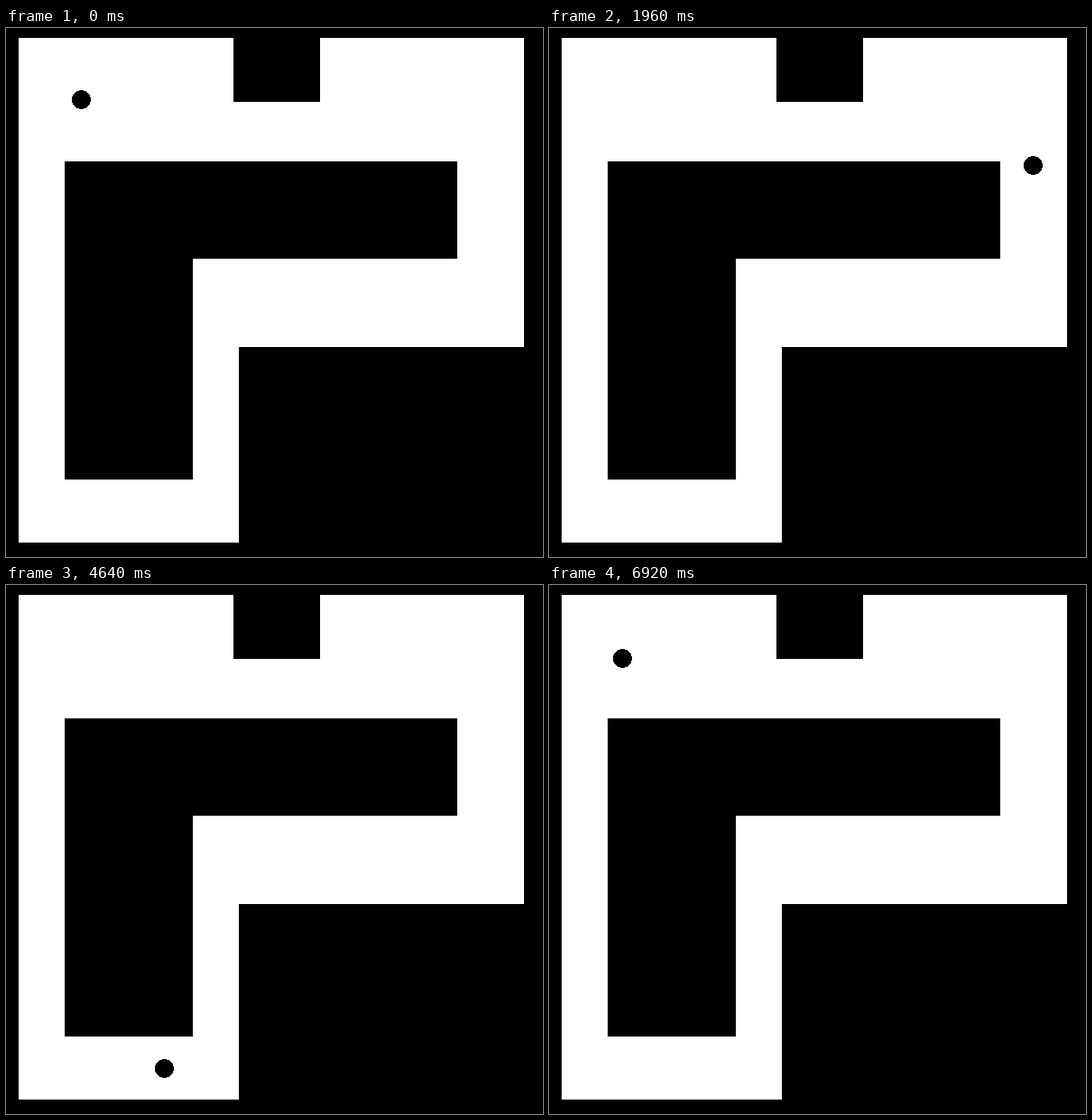
These frames come from a looping animation (595 by 587 pixels, 6960 ms). An HTML page:

```html
<!DOCTYPE html>
<html>
<head>
<meta charset="utf-8">
<title>Dot touring a corridor</title>
<style>
  html, body { margin: 0; width: 100%; height: 100%; overflow: hidden; background: #000; }
  svg { display: block; }
</style>
</head>
<body>
<svg width="595" height="587" shape-rendering="crispEdges">
  <path fill="#fff" fill-rule="evenodd" d="M14 11H252V82H348V11H574V354H258V571H14Z
    M65 148H500V256H207V501H65Z"/>
  <circle id="dot" r="10.5"/>
</svg>
<script>
const STEP_MS = 40, STEPS = 174, STEP_PX = 10;
const dot = document.getElementById('dot');

// Middle line of the corridor
const route = [
  [83, 79], [183, 79], [186, 82], [252, 115], [348, 115], [414, 82], [417, 79],
  [500, 79], [502, 81], [536, 148], [536, 256], [516, 296], [500, 305],
  [257, 305], [232, 354], [232, 501], [217, 530], [207, 536], [65, 536],
  [54, 530], [39, 501], [39, 148], [65, 97], [83, 79]
];

// A diagonal pixel move counts the same as a straight one
function pointAt(dist) {
  for (let i = 1; i < route.length; i++) {
    const [x0, y0] = route[i - 1], [x1, y1] = route[i];
    const len = Math.max(Math.abs(x1 - x0), Math.abs(y1 - y0));
    if (dist <= len) {
      const k = dist / len;
      return [x0 + (x1 - x0) * k, y0 + (y1 - y0) * k];
    }
    dist -= len;
  }
  return route[0];
}

const start = performance.now();

function draw(now) {
  const step = Math.floor(Math.max(0, now - start) / STEP_MS) % STEPS;
  const [x, y] = pointAt(step * STEP_PX);
  dot.setAttribute('cx', Math.round(x) + 0.5);
  dot.setAttribute('cy', Math.round(y) + 0.5);
  requestAnimationFrame(draw);
}
draw(start);
</script>
</body>
</html>
```
